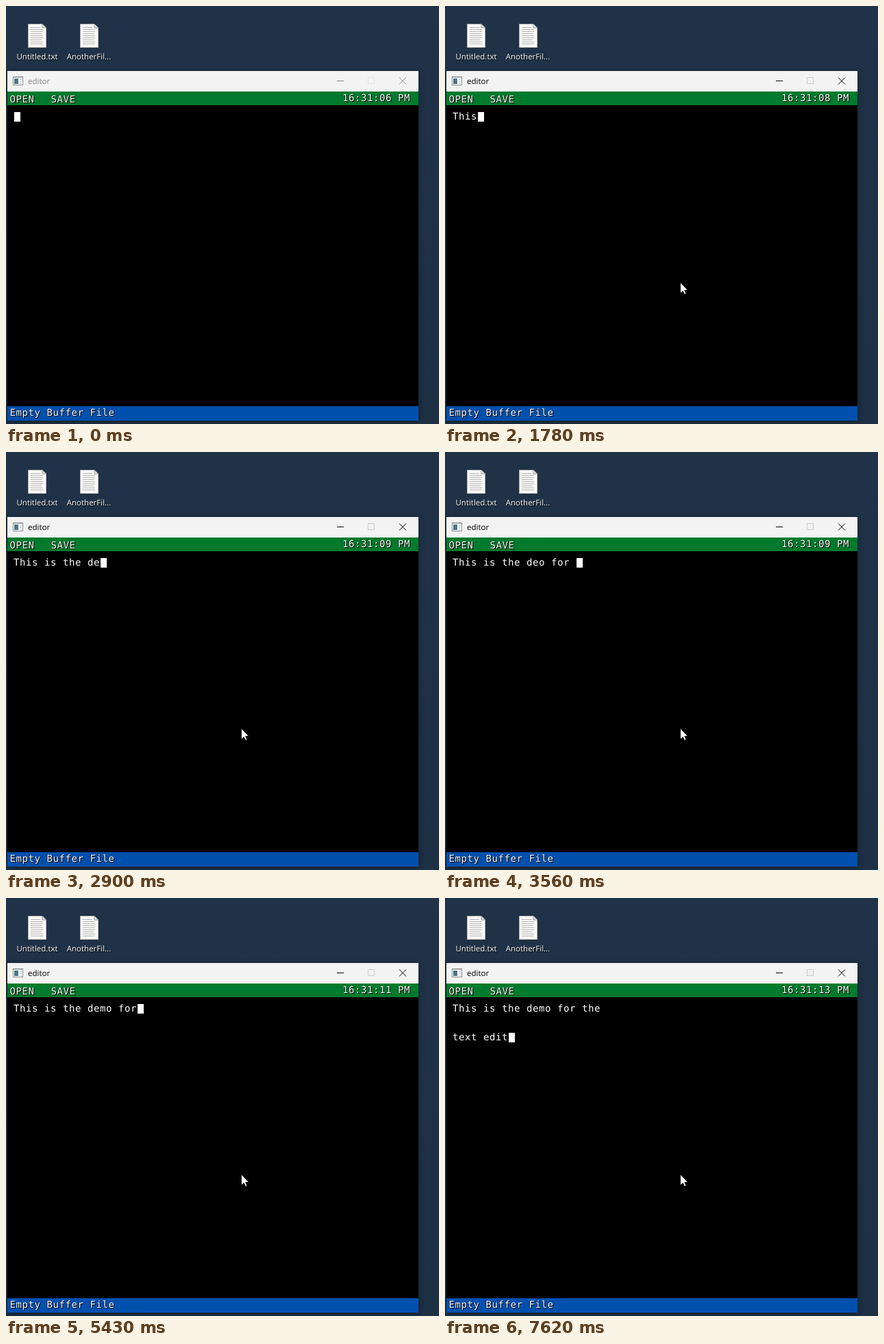
An HTML page that plays this animation: 632x611 px, repeating every 8000 ms.

```html
<!DOCTYPE html>
<html lang="en">
<head>
<meta charset="utf-8">
<title>Text editor</title>
<style>
  html, body { margin: 0; width: 100%; height: 100%; overflow: hidden; background: #203247; }
  svg { display: block; text-rendering: geometricPrecision; }
  .mono { font: 14px "DejaVu Sans Mono", monospace; letter-spacing: .572px; fill: #fff; white-space: pre; }
  .bar { text-shadow: 1px 1px 0 #000, -1px 0 0 rgba(0, 0, 0, .5); }
  .label { font: 11.5px "Open Sans", sans-serif; fill: #fff; text-anchor: middle; text-shadow: 1px 1px 1px #000; }
  .title { font: 11.5px "Open Sans", sans-serif; }
  .frame { filter: drop-shadow(0 2px 5px rgba(0, 0, 0, .3)); }
</style>
</head>
<body>
<svg width="632" height="611" viewBox="0 0 632 611">
  <defs>
    <linearGradient id="sky" x2="0" y2="1">
      <stop stop-color="#203247"/>
      <stop offset="1" stop-color="#1d3044"/>
    </linearGradient>
    <g id="file">
      <path d="M.5 .5H21L26.5 6V34.5H.5Z" fill="#f8f8f6" stroke="#b4b4b0"/>
      <path d="M21 .5V6H26.5" fill="#ddd" stroke="#a0a09c"/>
      <path d="M4 5.5H18M4 8.5H22M4 11.5H22M4 14.5H21M4 17.5H22M4 20.5H22M4 23.5H20M4 26.5H22M4 29.5H22" stroke="#b3b5b5"/>
    </g>
  </defs>

  <rect width="632" height="611" fill="url(#sky)"/>
  <use href="#file" x="32" y="26"/>
  <use href="#file" x="108" y="26"/>
  <text class="label" x="45.5" y="78">Untitled.txt</text>
  <text class="label" x="121" y="78">AnotherFil...</text>

  <rect class="frame" x="2" y="95" width="600" height="511"/>
  <rect x="2" y="95" width="600" height="30" fill="#f3f3f3"/>
  <g>
    <rect x="10.5" y="103.5" width="14" height="12" fill="#fff" stroke="#8a8f92"/>
    <path d="M11 104.5H24" stroke="#b9bec0"/>
    <rect x="12" y="106" width="6" height="8" fill="#4a7788"/>
    <path d="M20 107.5H23M20 110.5H23M20 113.5H23" stroke="#c3c6c8"/>
  </g>
  <text class="title" id="title" x="32" y="114">editor</text>
  <g id="buttons" fill="none">
    <path d="M483 109.5H493" shape-rendering="crispEdges"/>
    <path d="M574 104.5L584 114.5M584 104.5L574 114.5"/>
  </g>
  <rect id="maximize" x="528.5" y="104.5" width="9" height="9" fill="none" stroke="#ccc"/>

  <rect x="2" y="125" width="600" height="20" fill="#007a2d"/>
  <rect x="2" y="585" width="600" height="21" fill="#0050ae"/>
  <g class="mono bar">
    <text x="5.5" y="141">OPEN</text>
    <text x="65.5" y="141">SAVE</text>
    <text id="clock" x="491" y="139"></text>
    <text x="5.5" y="599">Empty Buffer File</text>
  </g>

  <g class="mono">
    <text class="line" x="11" y="166"></text>
    <text class="line" x="11" y="187"></text>
    <text class="line" x="11" y="208"></text>
  </g>
  <rect id="caret" width="9" height="14" fill="#fff"/>
  <path id="mouse" d="M343.5 404V420L347.2 416.6L349.6 421.6L352 420.5L349.7 415.6H354.6Z" fill="#fff" stroke="#000" stroke-width=".8"/>
</svg>
<script>
  const LOOP = 8000;
  // [first key, last key, keys]; "<" deletes, "+" advances the clock
  const bursts = [
    [650, 650, "+"],
    [1320, 1640, "Thi+"], [1780, 1780, "s"],
    [1980, 2170, " is "],
    [2310, 2900, "the +de"], [2970, 3040, "o "],
    [3170, 3300, "for"], [3560, 3560, " "],
    [3630, 3630, "<+"], [3770, 3890, "<<"], [4100, 4220, "<<"], [4640, 4640, "<"],
    [4770, 4770, "m+"], [4870, 5170, "o fo"],
    [5370, 5630, "r t+"], [5830, 5890, "he"],
    [6160, 6160, "\n"], [6430, 6430, "\n"],
    [6490, 6490, "t"], [6620, 6620, "+"],
    [6890, 7620, "ext edit"]
  ];
  const keys = bursts.flatMap(([from, to, chars]) =>
    [...chars].map((key, i) => ({
      key,
      at: Math.round(from + (to - from) * i / Math.max(1, chars.length - 1))
    })));

  const $ = id => document.getElementById(id);
  const lineEls = document.querySelectorAll(".line");

  function stateAt(t) {
    let text = "", seconds = 6;
    for (const { key, at } of keys) {
      if (at > t) break;
      if (key === "+") seconds++;
      else if (key === "<") text = text.slice(0, -1);
      else text += key;
    }
    return { lines: text.split("\n"), seconds };
  }

  function drawFocus(t) {
    const step = t < 460 ? 0 : Math.min(4, 1 + Math.floor((t - 460) / 63));
    const grey = Math.round(136 * (1 - step / 4));
    const ink = `rgb(${grey},${grey},${grey})`;
    $("title").style.fill = ink;
    $("buttons").style.stroke = ink;
    $("maximize").style.opacity = step ? 1 : .4;
    $("mouse").style.visibility = step ? "visible" : "hidden";
  }

  function draw() {
    const t = performance.now() % LOOP;
    const { lines, seconds } = stateAt(t);
    lineEls.forEach((el, i) => { el.textContent = lines[i] || ""; });
    $("clock").textContent = `16:31:${String(seconds).padStart(2, "0")} PM`;
    const row = lines.length - 1;
    $("caret").setAttribute("x", 12 + 9 * lines[row].length);
    $("caret").setAttribute("y", 155 + 21 * row);
    drawFocus(t);
    requestAnimationFrame(draw);
  }
  draw();
</script>
</body>
</html>
```
